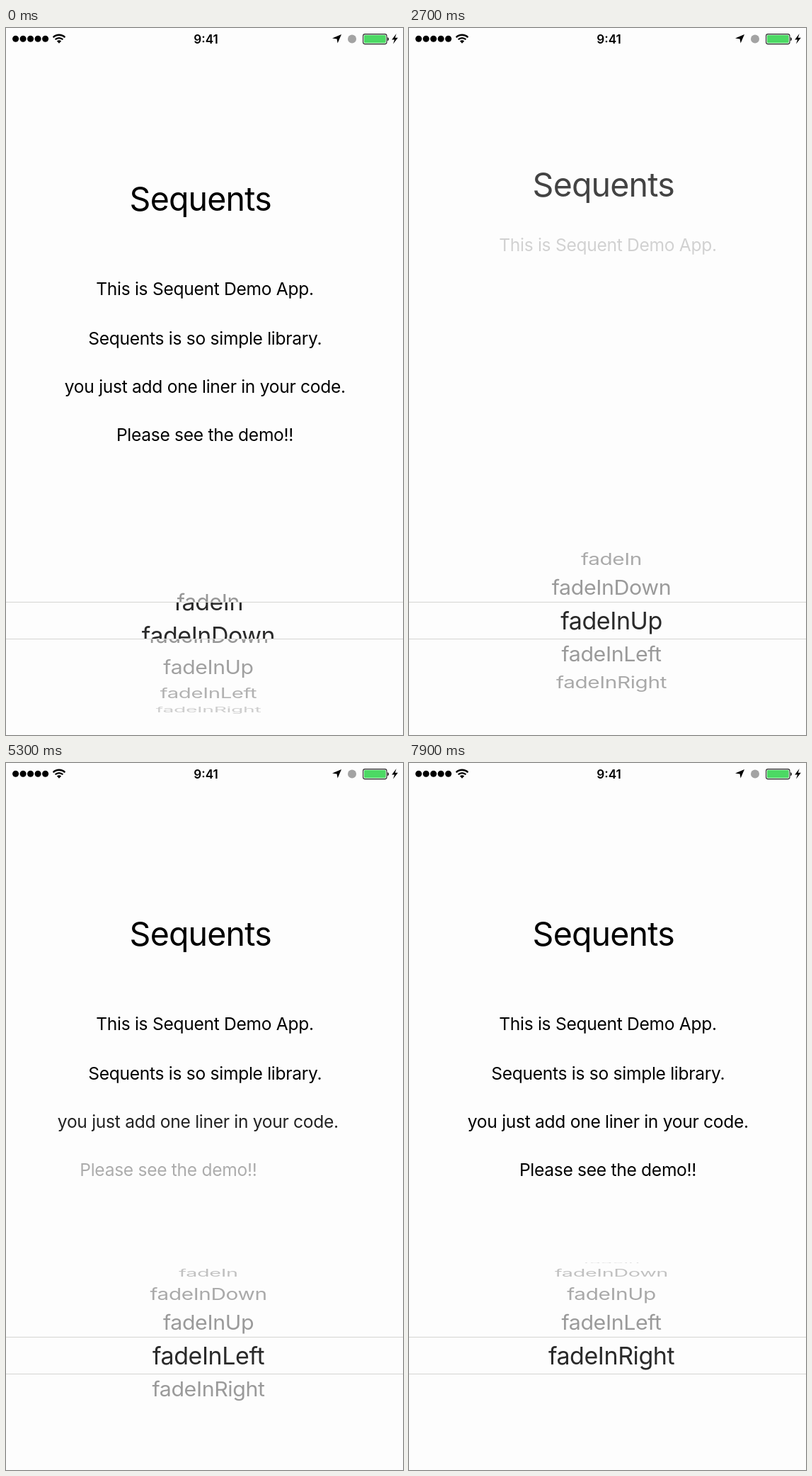
Write an HTML page that moves like this. It is 561 by 998 pixels and loops after 8000 ms.

```html
<!DOCTYPE html>
<html lang="en">
<head>
<meta charset="utf-8">
<title>Sequents demo</title>
<style>
  html, body { margin: 0; width: 100%; height: 100%; overflow: hidden; background: #fdfdfd; }
  svg { display: block; width: 100vw; height: 100vh; }
  text { font-family: Inter, Roboto, sans-serif; font-optical-sizing: none; text-anchor: middle; }
  .title { font-size: 46.5px; letter-spacing: -.8px; }
  .line { font-size: 24.6px; letter-spacing: -.3px; }
  .row { font-size: 34px; letter-spacing: -.45px; }
  .clock { font-size: 17.2px; font-weight: 600; }
</style>
</head>
<body>
<svg viewBox="0 0 561 998">
  <defs>
    <clipPath id="lensClip"><rect y="811" width="561" height="51"/></clipPath>
    <clipPath id="wheelClip"><path d="M0 705H561V810H0ZM0 863H561V968H0Z"/></clipPath>
  </defs>
  <rect width="561" height="998" fill="#fdfdfd"/>

  <g id="status">
    <g id="signal"></g>
    <g fill="none" stroke="#000" stroke-width="2.3">
      <path d="M66.6 13.2A12 12 0 0 1 83.4 13.2"/>
      <path d="M69.6 16.3A7.7 7.7 0 0 1 80.4 16.3"/>
    </g>
    <path d="M75 21.8L71.9 18.6A4.4 4.4 0 0 1 78.1 18.6Z"/>
    <text class="clock" x="282.5" y="21.6">9:41</text>
    <path d="M474 9L468.6 21.5L467.6 15.6L461 14.6Z"/>
    <circle cx="489" cy="15.5" r="6" fill="#a3a3a3"/>
    <rect x="504.6" y="8.6" width="33.4" height="14" rx="2.6" fill="#fff" stroke="#222" stroke-width="1.1"/>
    <rect x="506" y="10" width="30.6" height="11.2" rx="1.4" fill="#4cd964"/>
    <path d="M539.2 13A3 3 0 0 1 539.2 18.4Z"/>
    <path d="M551.6 8L545.2 16.4H549L547 22.6L553.8 13.8H549.8Z"/>
  </g>

  <g id="labels"></g>
  <g id="wheel" clip-path="url(#wheelClip)"></g>
  <g id="lens" clip-path="url(#lensClip)" fill="#2a2a2a"></g>
  <path d="M0 810.5H561M0 862.5H561" stroke="#d5d5d2"/>
</svg>
<script>
const LOOP = 8000;
const DURATION = 500, STAGGER = 200, SHIFT = 75;
const RADIUS = 133, STEP = 20.5 * Math.PI / 180;
const WHEEL_X = 286, WHEEL_Y = 836.6;

const copy = [
  ['Sequents', 274.8, 257.5, 'title'],
  ['This is Sequent Demo App.', 281, 377, 'line'],
  ['Sequents is so simple library.', 281.3, 447, 'line'],
  ['you just add one liner in your code.', 281.3, 515, 'line'],
  ['Please see the demo!!', 281, 583, 'line']
];
const names = ['fadeIn', 'fadeInDown', 'fadeInUp', 'fadeInLeft', 'fadeInRight'];

// Each run: start time and the direction the labels come from
const runs = [
  { at: 350, dx: 0, dy: 1 },
  { at: 2370, dx: 0, dy: -1 },
  { at: 4315, dx: -1, dy: 0 },
  { at: 6405, dx: 1, dy: 0 }
];

// Picker position: time, selected row
const scroll = [
  [-350, 0], [300, 1], [1880, 1], [2360, 2], [3680, 2],
  [4180, 3.1], [4450, 3], [5700, 3], [6380, 4], [LOOP, 4]
];

const byId = id => document.getElementById(id);

function add(parent, tag, attrs, content = '') {
  const node = document.createElementNS('http://www.w3.org/2000/svg', tag);
  for (const key in attrs) node.setAttribute(key, attrs[key]);
  node.textContent = content;
  return parent.appendChild(node);
}

for (let i = 0; i < 5; i++) add(byId('signal'), 'circle', { cx: 13.6 + i * 10.5, cy: 15.3, r: 4.5 });

const labels = copy.map(([text, x, y, cls]) => add(byId('labels'), 'text', { x, y, class: cls }, text));
const makeRows = id => names.map(name => add(byId(id), 'text', { y: 12.3, class: 'row' }, name));
const wheelRows = makeRows('wheel');
const lensRows = makeRows('lens');

const clamp = v => Math.min(1, Math.max(0, v));
const smooth = v => v * v * (3 - 2 * v);

function wheelPosition(t) {
  const i = scroll.findIndex(([at]) => at > t);
  const [t0, p0] = scroll[i - 1], [t1, p1] = scroll[i];
  return p0 + (p1 - p0) * smooth((t - t0) / (t1 - t0));
}

function drawLabels(t) {
  const run = runs.filter(r => r.at <= t).pop();
  labels.forEach((node, i) => {
    const p = run ? smooth(clamp((t - run.at - i * STAGGER) / DURATION)) : 1;
    const d = SHIFT * (1 - p);
    node.setAttribute('opacity', p);
    node.setAttribute('transform', run ? `translate(${run.dx * d} ${run.dy * d})` : '');
  });
}

function drawWheel(t) {
  const pos = wheelPosition(t);
  names.forEach((_, i) => {
    const angle = (i - pos) * STEP;
    const visible = Math.abs(angle) < Math.PI / 2;
    const cos = Math.cos(angle);
    const place = `translate(${WHEEL_X} ${WHEEL_Y + RADIUS * Math.sin(angle)})`;
    const narrow = 1 - .11 * (1 - cos);
    wheelRows[i].setAttribute('transform', `${place} scale(${.9 * narrow} ${.9 * cos})`);
    wheelRows[i].setAttribute('opacity', visible ? .41 - .34 * (1 - cos) : 0);
    lensRows[i].setAttribute('transform', `${place} scale(${narrow} ${cos})`);
    lensRows[i].setAttribute('opacity', visible ? 1 : 0);
  });
}

const origin = performance.now();

function frame(now) {
  const t = Math.max(0, now - origin) % LOOP;
  drawLabels(t);
  drawWheel(t);
  requestAnimationFrame(frame);
}
frame(origin);
</script>
</body>
</html>
```
